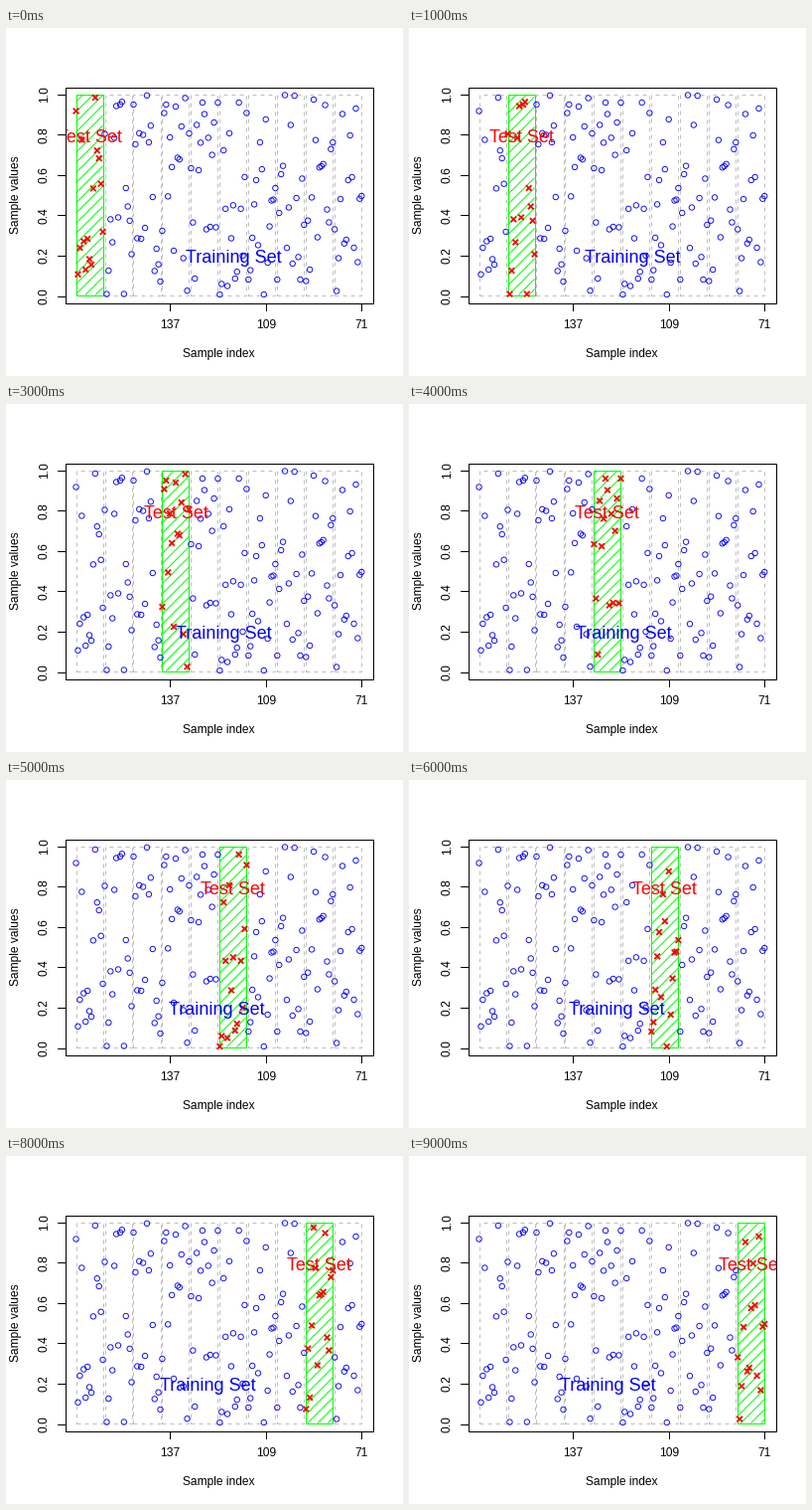
Recreate the animation shown at these times as a matplotlib script. Size 400 by 350 pixels, loop 10 s.

```python
import numpy as np
import matplotlib.pyplot as plt
from matplotlib.animation import FuncAnimation
from matplotlib.collections import LineCollection
from matplotlib.patches import Rectangle

W, H, DPI = 400, 350, 100
PX = 72 / DPI                       # one pixel in points
FOLDS, SIZE = 10, 15
STEP, X1 = 1.9309, 70.55            # pixels per sample, x of sample 1
TOP, BOTTOM = 67.1, 268.5           # extent of the samples
ZERO, UNIT = 269.6, 203.0           # y of value 0, pixels per unit
LEFT, RIGHT, ROOF, FLOOR = 59.5, 369.5, 59.5, 276.5

# Stage height of every other sample, one row per fold
known = np.array([
    [83.5, 221, 214.5, 212, 238, 70, 131, 205],
    [106.5, 244, 215.5, 78.5, 77, 267.5, 179.5, 227.5],
    [77, 211.5, 212, 201, 115, 170, 222, 255],
    [204, 77, 110, 224, 130.5, 99, 70.5, 106],
    [141, 252, 143, 75, 202.5, 200, 95, 75],
    [268, 123, 259.5, 211.5, 252, 75, 229, 85.5],
    [253, 211, 153, 115, 268, 236, 173.5, 161],
    [253, 147, 67.5, 180.5, 237, 171, 253, 198],
    [254.5, 243, 72, 210.5, 139, 77.5, 195.5, 115],
    [202.5, 231.5, 86.5, 213, 108, 221, 235.5, 169],
])

# The samples in between are uniform noise
rng = np.random.default_rng(7)
heights = rng.uniform(TOP, BOTTOM, (FOLDS, SIZE))
heights[:, ::2] = known


def sample_x(i):
    return X1 + STEP * (i - 1)


index = np.arange(1, FOLDS * SIZE + 1)
points = np.column_stack([sample_x(index), heights.ravel()])

plt.rcParams["font.family"] = "Liberation Sans"
fig = plt.figure(figsize=(W / DPI, H / DPI), dpi=DPI, facecolor="white")
ax = fig.add_axes([0, 0, 1, 1])
ax.set_xlim(0, W)
ax.set_ylim(H, 0)
ax.axis("off")


def label(x, y, text, size=12, color="black", **kw):
    return ax.text(x, y, text, fontsize=size * PX, color=color, ha="center",
                   va="baseline", rotation_mode="anchor", **kw)


def line(xs, ys):
    ax.plot(xs, ys, color="black", lw=PX, zorder=6)


def box(x, y, w, h, **kw):
    return ax.add_patch(Rectangle((x, y), w, h, fill=False, lw=PX, **kw))


def fold_box(k, **kw):
    return box(sample_x(k * SIZE + 1), BOTTOM, STEP * (SIZE - 1), TOP - BOTTOM, **kw)


def draw_axes():
    frame = box(LEFT, ROOF, RIGHT - LEFT, FLOOR - ROOF, ec="black", zorder=6)
    for i, name in ((50, "137"), (100, "109"), (150, "71")):
        line([sample_x(i)] * 2, [FLOOR, FLOOR + 7.2])
        label(sample_x(i), 302.5, name)
    for v in np.arange(6) / 5:
        y = ZERO - UNIT * v
        line([LEFT - 7.2, LEFT], [y, y])
        label(41.8, y, f"{v:.1f}", rotation=90)
    label(214.4, 331.5, "Sample index")
    label(13, 167.8, "Sample values", rotation=90)
    return frame


def hatch(left, right):
    """Rising 45 degree lines inside the fold, in phase with sample 0."""
    gap = 7.2 * np.sqrt(2)
    segs = []
    for c in sample_x(0) + gap * np.arange(-25, 32):
        a = max(left, c + ZERO - BOTTOM)
        b = min(right, c + ZERO - TOP)
        if a < b:
            segs.append([(a, c + ZERO - a), (b, c + ZERO - b)])
    return segs


def crosses(pts, r=2.8):
    segs = []
    for x, y in pts:
        segs.append([(x - r, y - r), (x + r, y + r)])
        segs.append([(x - r, y + r), (x + r, y - r)])
    return segs


def segments(color, width, zorder):
    coll = LineCollection([], colors=color, linewidths=width * PX, zorder=zorder)
    return ax.add_collection(coll, autolim=False)


frame = draw_axes()
for k in range(FOLDS):
    fold_box(k, ec="#bebebe", ls=(0, (4, 4)), zorder=1)
test_box = fold_box(0, ec="#00ff00", zorder=2)
stripes = segments("#00ff00", 1, 2)
train_dots = ax.scatter([], [], s=(5.4 * PX) ** 2, facecolors="none",
                        edgecolors="blue", linewidths=0.9 * PX, zorder=3)
test_marks = segments("red", 1.8, 4)
test_text = label(0, 115, "Test Set", 18, "red", zorder=5)
train_text = label(0, 236, "Training Set", 18, "blue", zorder=5)
for t in (test_text, train_text):
    t.set_clip_on(True)
    t.set_clip_path(frame)


def update(k):
    test = (index - 1) // SIZE == k
    left, right = sample_x(index[test][[0, -1]])
    test_box.set_x(left)
    stripes.set_segments(hatch(left, right))
    train_dots.set_offsets(points[~test])
    test_marks.set_segments(crosses(points[test]))
    test_text.set_x(sample_x(index[test].mean()))
    train_text.set_x(sample_x(index[~test].mean()))
    return []


anim = FuncAnimation(fig, update, frames=FOLDS, interval=1000,
                     init_func=lambda: update(0), repeat=True, repeat_delay=0)
plt.show()
```
